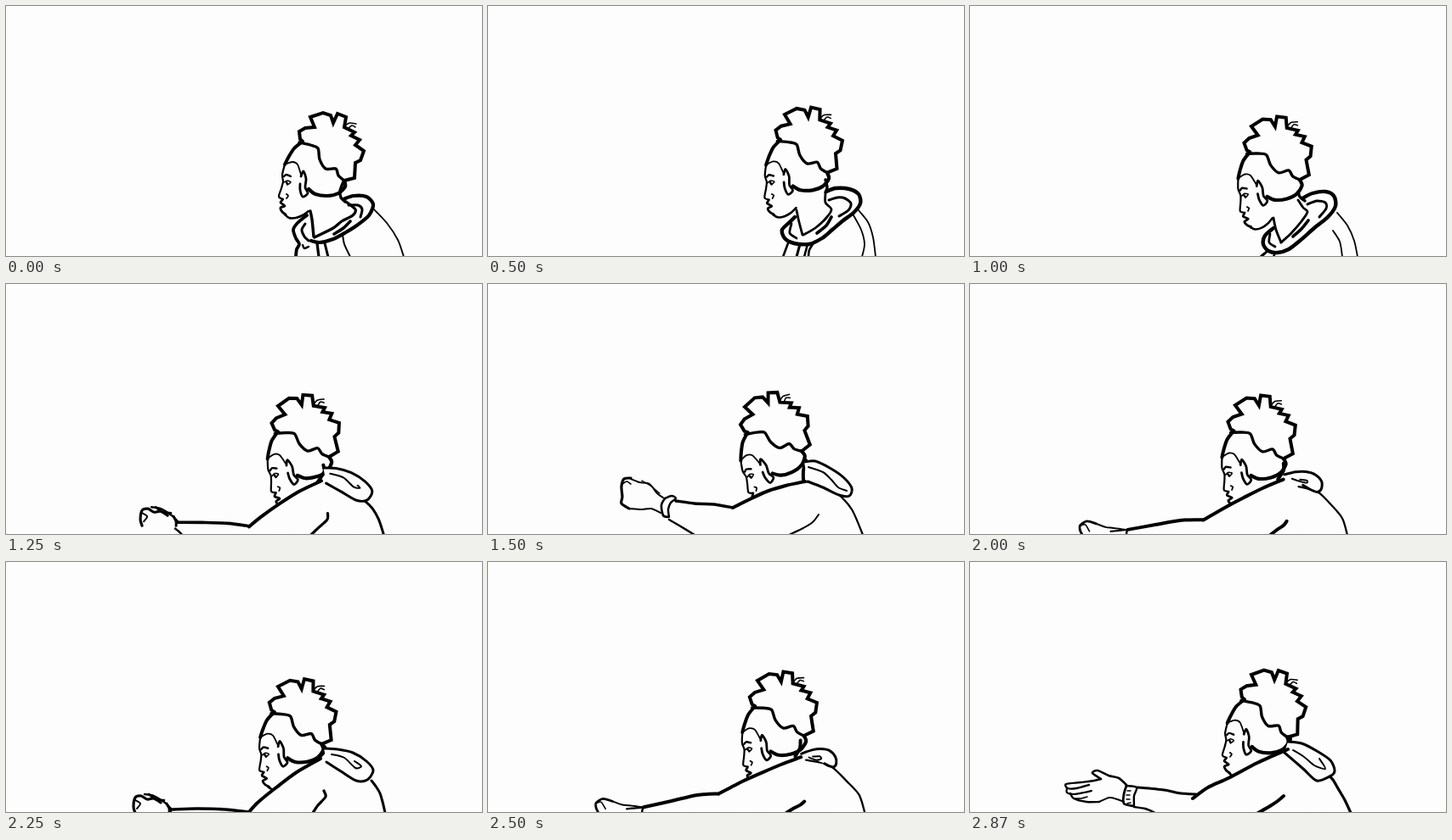
Recreate the animation shown at these times as an HTML page. Size 560 by 295 pixels, loop 3870 ms.

```html
<!DOCTYPE html>
<html lang="en">
<head>
<meta charset="utf-8">
<title>Reaching out</title>
<style>
html, body { margin: 0; width: 100%; height: 100%; overflow: hidden; background: #fdfdfd; }
svg { display: block; width: 100vw; height: 100vh; }
</style>
</head>
<body>
<svg id="stage" viewBox="0 0 560 295" fill="none" stroke="#000" stroke-linecap="round" stroke-linejoin="round"></svg>
<script>
const PAPER = '#fdfdfd';
const LOOP = 3870;
const PIVOT = [358, 131];

const parse = s => s.split(' ').map(p => p.split(',').map(Number));
const lerp = (a, b, t) => a + (b - a) * t;
const mixPts = (p, q, t) => p.map((v, i) => v.map((n, k) => lerp(n, q[i][k], t)));
const num = n => n.toFixed(1);

// Catmull-Rom spline through the points
function curve(p) {
  let d = `M${p[0].map(num)}`;
  for (let i = 0; i < p.length - 1; i++) {
    const a = p[i - 1] || p[i], b = p[i], c = p[i + 1], e = p[i + 2] || c;
    const c1 = b.map((n, k) => num(n + (c[k] - a[k]) / 7));
    const c2 = c.map((n, k) => num(n - (e[k] - b[k]) / 7));
    d += `C${c1} ${c2} ${c.map(num)}`;
  }
  return d;
}
const poly = p => 'M' + p.map(v => v.map(num)).join('L');
const path = (d, w, fill = 'none', extra = '') =>
  `<path d="${d}" stroke-width="${w}" fill="${fill}" ${extra}/>`;
const ink = (s, w) => path(curve(parse(s)), w);
const inkAll = list => list.map(([w, s]) => ink(s, w)).join('');

const HEAD =
  path(poly(parse('349,160 346,157 345,148 352,144 363,143 358,131 373,126 382,129 385,138 390,127 400,131 398,143 410,149 406,153 416,158 411,164 421,171 417,182 411,185 410,203 398,206')), 4, 'none', 'stroke-linejoin="miter"') +
  inkAll([
    [3.4, '345,161 358,164 367,168 369,181 376,192 388,192 391,200 398,206'],
    [4, '349,160 339,168 332,179 328,187'],
    [4.2, '398,206 399,213 391,221 378,224 364,222 356,216'],
    [1.6, '398,142 404,138 412,139'],
    [1.6, '402,145 407,141 411,143'],
    [1.8, '330,186 337,184 343,187 347,199'],
    [2.8, '347,201 350,195 353,204 352,214 355,221 349,225 346,217 346,210'],
    [2.2, '328,187 325,199 326,207 324,215 321,225 326,228'],
    [2.8, '325,229 323,232 328,236 323,238 325,243 329,246'],
    [2.6, '328,246 333,250 341,250 349,247 356,242'],
    [2.4, '327,201 330,199 335,201'],
    [1.6, '327,208 331,206 335,208 331,211'],
    [2.6, '330,208 331,210'],
    [1.8, '330,222 332,224 330,227']
  ]);

const STAND = [
  [
    [3.4, '397,207 393,218 394,226 399,231'],
    [4.2, '397,228 409,224 424,225 432,234 427,247 414,258 400,267 385,275 369,279 359,277'],
    [3.2, '400,231 411,240 408,247 395,254 385,262 363,273'],
    [3, '403,235 414,235 419,240 417,249'],
    [3.6, '405,254 397,262 386,269'],
    [3.4, '358,242 360,252 362,272'],
    [3.8, '354,247 343,256 338,264 341,274 345,281 342,287 341,296'],
    [3, '352,257 348,264 351,272 356,277'],
    [2.4, '349,282 351,286 356,284'],
    [3.2, '366,280 368,296'],
    [3, '375,280 379,296'],
    [2, '396,270 398,281 405,296'],
    [1.8, '433,240 448,256 461,276 468,296']
  ],
  [
    [3.4, '397,205 399,214 397,220'],
    [4.4, '398,219 409,215 425,216 436,222 438,233 430,244 418,253 405,264 393,274 378,281 360,280 349,274 346,264 355,255 361,249'],
    [2.8, '397,221 397,232 404,240 398,250 385,262 371,270'],
    [3, '401,229 411,226 420,227 427,233 424,241 413,248'],
    [3.6, '404,249 398,259 387,268'],
    [2.8, '363,241 366,255 370,270'],
    [2.8, '357,257 355,268 363,274'],
    [2.6, '353,280 347,296'],
    [3, '367,281 363,296'],
    [2.6, '376,281 372,296'],
    [2.6, '384,278 378,288 377,296'],
    [1.8, '435,240 447,255 453,273 456,296'],
    [1.8, '430,247 439,264 443,281 440,296']
  ],
  [
    [3.4, '386,219 388,225 394,230'],
    [4.4, '391,227 403,221 418,219 428,224 430,236 421,249 405,262 388,277 375,287 362,291 351,289 345,281 347,271 357,262'],
    [2.8, '386,229 392,238 397,243 390,254 378,268 366,279'],
    [3, '397,234 408,230 418,232 419,239 411,249'],
    [3.6, '398,253 390,263 380,272'],
    [2.8, '357,250 360,264 366,279'],
    [2.8, '353,269 352,279 359,284'],
    [3, '350,289 342,296'],
    [2.6, '359,291 357,296'],
    [1.8, '432,244 444,259 452,277 456,296'],
    [1.8, '427,265 435,278 438,296']
  ]
];

// Shared line order lets the reaching poses blend
const KEYS = ['fore', 'shoulder', 'back', 'hood', 'inner', 'crease', 'under', 'nape'];
const WIDTH = { fore: 3, shoulder: 4, back: 2.3, hood: 3, inner: 2, crease: 2.6, under: 2.4, nape: 4 };

function reach(lines, hand, weights = {}) {
  const pose = { hand, widths: { ...WIDTH, ...weights } };
  KEYS.forEach((k, i) => pose[k] = parse(lines[i]));
  return pose;
}

const PUNCH = reach([
  '221,256 243,259 266,260 288,264',
  '288,264 310,253 330,244 350,238 373,233',
  '373,233 395,237 411,247 428,266 441,296',
  '372,210 385,209 402,217 418,228 428,241 425,250 413,249 394,240 376,233',
  '377,216 394,222 404,231 412,240 422,244',
  '389,272 382,281 369,289 354,296',
  '213,278 225,285 243,296',
  '374,208 371,220 371,232'
], [
  [3.2, '168,229 160,230 157,239 158,251 157,259 166,265'],
  [2, '166,265 180,266 192,265 203,270'],
  [2, '168,230 178,234 190,236 199,247 206,252'],
  [1.6, '157,237 163,233 168,236'],
  [1.4, '181,232 191,238 202,247'],
  [2.6, '208,253 204,261 206,273 212,275'],
  [2.4, '208,253 216,250 221,253 215,258 212,266 213,275']
], { fore: 3.4, crease: 2 });

const LOW = reach([
  '182,289 215,281 245,273 270,271',
  '270,271 300,256 322,247 345,238 368,230',
  '368,231 398,237 420,257 436,274 443,296',
  '368,227 380,222 390,220 399,221 406,228 408,236 406,240 402,240 398,238',
  '377,231 385,234 390,231 387,228 379,229',
  '372,284 366,288 359,291 350,296',
  '181,291 180,293 180,297',
  '367,210 366,219 361,229'
], [
  [2.8, '145,282 134,279 126,284 126,290 129,296'],
  [2, '145,282 156,286 165,287 180,289'],
  [2.2, '162,291 172,290 183,289'],
  [1.6, '127,284 132,283 137,291']
], { fore: 4, crease: 4 });

const BRACE = reach([
  '194,292 225,291 258,292 285,295',
  '285,296 296,284 318,266 342,248 370,232',
  '430,258 436,266 440,273 443,283 446,296',
  '374,220 390,221 408,225 424,235 432,246 425,257 412,258 394,247 377,236',
  '383,227 398,231 411,243 418,241 410,235',
  '374,270 376,277 367,287 361,296',
  '193,293 194,295 194,298',
  '373,216 376,222 365,234'
], [
  [3.2, '152,296 150,289 152,278 159,276 166,280 174,279 182,284'],
  [2.4, '163,274 174,276 187,284 194,291'],
  [2.6, '168,274 176,280 186,281'],
  [2, '152,281 158,285 154,291'],
  [3, '189,285 192,291 192,296']
], { fore: 3.6, back: 3, crease: 3.2 });

const OPEN = reach([
  '197,266 228,269 248,273 266,274',
  '262,279 280,266 304,255 338,237 374,221',
  '421,251 427,257 434,269 441,281 448,296',
  '374,212 390,214 408,223 424,234 429,246 425,252 408,258 392,244 370,225',
  '380,222 393,230 405,240 418,244 411,232',
  '369,276 362,282 353,288 339,296',
  '193,289 206,291 218,296',
  '377,207 376,213 369,221'
], [
  [2.6, '154,256 144,249 150,246 163,252 175,255 184,263'],
  [2.4, '154,256 146,258 130,260 113,262 115,267 125,267 140,263'],
  [2.2, '114,267 114,272 122,274 134,272 143,270'],
  [2.4, '118,273 122,279 137,283 152,283'],
  [2, '152,283 164,278 173,280 181,283'],
  [1.6, '122,279 131,279 138,277'],
  [2.8, '184,264 181,274 181,285 192,288'],
  [2.4, '184,264 196,266 193,276 193,288'],
  [1.5, '185,270 189,270'],
  [1.5, '184,275 188,275'],
  [1.5, '184,280 188,280'],
  [1.5, '185,285 189,284']
], { back: 3.2, crease: 4 });

function blend(a, b, t) {
  const near = t < 0.5 ? a : b;
  const pose = { widths: near.widths };
  KEYS.forEach(k => pose[k] = mixPts(a[k], b[k], t));
  const dx = pose.fore[0][0] - near.fore[0][0];
  const dy = pose.fore[0][1] - near.fore[0][1];
  pose.hand = near.hand;
  pose.shift = [dx, dy];
  return pose;
}

function drawReach(p) {
  const line = k => path(curve(p[k]), p.widths[k]);
  const [dx, dy] = p.shift || [0, 0];
  return path(poly([...p.fore, ...p.shoulder, ...p.back]), 0, PAPER, 'stroke="none"') +
    line('nape') + line('back') +
    path(curve(p.hood), p.widths.hood, PAPER) +
    ['inner', 'fore', 'shoulder', 'crease', 'under'].map(line).join('') +
    `<g transform="translate(${num(dx)} ${num(dy)})">${inkAll(p.hand)}</g>`;
}

// start time, head x, head y, head turn, body
const TIMELINE = [
  [0, 358, 131, 0, STAND[0]],
  [500, 349, 128, -8, STAND[1]],
  [1000, 331, 142, -14, STAND[2]],
  [1250, 320, 144, -17, blend(BRACE, PUNCH, 0.3)],
  [1375, 310, 145, -21, blend(BRACE, PUNCH, 0.7)],
  [1500, 302, 145, -24, PUNCH],
  [1620, 304, 146, -20, blend(PUNCH, LOW, 0.5)],
  [1750, 307, 147, -16, LOW],
  [2000, 312, 143, -14, blend(LOW, BRACE, 0.3)],
  [2125, 317, 144, -11, blend(LOW, BRACE, 0.7)],
  [2250, 320, 147, -9, BRACE],
  [2500, 317, 140, -12, blend(BRACE, LOW, 0.9)],
  [2750, 326, 137, -5, blend(BRACE, OPEN, 0.7)],
  [2870, 331, 133, -1.8, OPEN]
];

const SCENES = TIMELINE.map(([, x, y, turn, body]) =>
  `<g transform="translate(${x} ${y}) rotate(${turn}) translate(${-PIVOT[0]} ${-PIVOT[1]})">${HEAD}</g>` +
  (Array.isArray(body) ? inkAll(body) : drawReach(body)));

const stage = document.getElementById('stage');
let shown = -1;

function render(ms) {
  const t = ms % LOOP;
  const i = TIMELINE.filter(k => k[0] <= t).length - 1;
  if (i !== shown) {
    stage.innerHTML = SCENES[i];
    shown = i;
  }
}

let start;
function tick(now) {
  start ??= now;
  render(Math.max(0, now - start));
  requestAnimationFrame(tick);
}
render(0);
requestAnimationFrame(tick);
</script>
</body>
</html>
```
